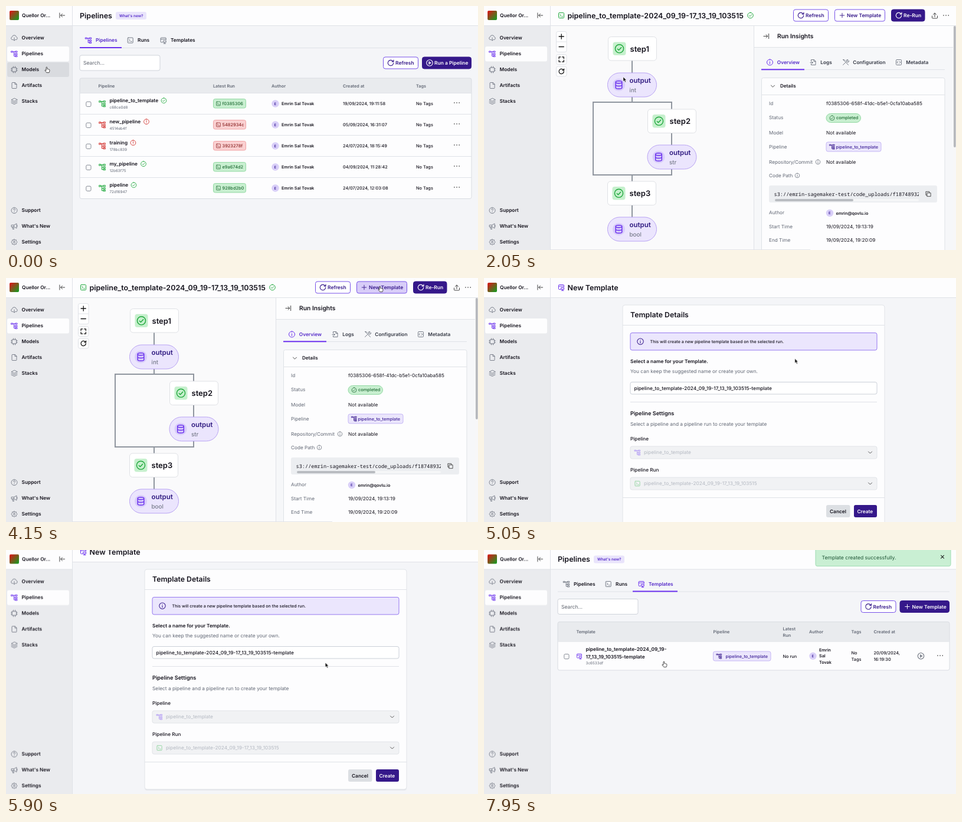
Recreate the animation shown at these times as an HTML page. Size 800x416 px, loop 8000 ms.

```html
<!DOCTYPE html>
<html lang="en">
<head>
<meta charset="utf-8">
<title>Pipeline dashboard</title>
<style>
html, body { margin: 0; width: 100%; height: 100%; overflow: hidden; background: #f4f5f8; }
svg { display: block; width: 100vw; height: 100vh; }
text { font-family: Inter, "Open Sans", sans-serif; text-rendering: geometricPrecision; white-space: pre; }
text.mono { font-family: "Noto Sans Mono", "DejaVu Sans Mono", monospace; }
</style>
</head>
<body>
<svg id="stage" viewBox="0 0 800 416"></svg>
<script>
const LOOP = 8000;
const INK = '#15131d', GRAY = '#626875', LINE = '#dfe2e7', WHITE = '#fdfdfe';
const DEEP = '#35188a', VIOLET = '#6a30ee', GREEN = '#1fa83c', RED = '#d2302c';
const PERSON = 'Emrin Sal Tovak', MAIL = 'emrin@qovlu.io';
const RUN = 'pipeline_to_template-2024_09_19-17_13_19_103515';

// Icons live on a 24 unit grid.
const RING = 'M12 2a10 10 0 1 0 0 20a10 10 0 1 0 0-20z';
const BOX = 'M5 3h14a2 2 0 0 1 2 2v14a2 2 0 0 1-2 2H5a2 2 0 0 1-2-2V5a2 2 0 0 1 2-2z';
const ICONS = {
  cloud: 'M7 18H6a5 5 0 0 1-1-9.8a7 7 0 0 1 13.7 0A5 5 0 0 1 18 18h-1M12 11v10M9 18l3 3 3-3',
  pipe: 'M2 3h5v4H2zM16 3h6v4h-6zM16 11h6v4h-6zM16 18h6v4h-6zM7 5h9M11 5v15h5M11 13h5',
  chip: 'M5 5h14v14H5zM9 1v4M15 1v4M9 19v4M15 19v4M1 9h4M1 15h4M19 9h4M19 15h4',
  file: 'M14 2H6a2 2 0 0 0-2 2v16a2 2 0 0 0 2 2h12a2 2 0 0 0 2-2V8zM14 2v6h6',
  layers: 'M12 2L2 7l10 5 10-5zM2 12l10 5 10-5M2 17l10 5 10-5',
  help: RING + 'M9 9a3 3 0 0 1 6 .5c0 2-3 2.5-3 4M12 17v.4',
  horn: 'M3 8h8l9-5v16l-9-5H3zM11 8v6M5 14l2 8h4l-2-8M22 9v4',
  gear: 'M12 2l2.5 3.2 4-.7.7 4L22 12l-2.8 3.5-.7 4-4-.7L12 22l-2.5-3.2-4 .7-.7-4L2 12l2.8-3.5.7-4 4 .7zM12 9a3 3 0 1 0 0 6a3 3 0 1 0 0-6z',
  fold: 'M3 3v18M22 12H7M13 6l-6 6 6 6',
  unfold: 'M21 3v18M2 12h15M11 6l6 6-6 6',
  term: BOX + 'M7 8l4 4-4 4M13 16h4',
  template: 'M21 10V5a2 2 0 0 0-2-2H5a2 2 0 0 0-2 2v12a2 2 0 0 0 2 2h4M3 8h18M12 13h9v6h-9zM16 19v4M13 23h7',
  refresh: 'M21 12a9 9 0 1 1-2.8-6.5L21.5 8M21.5 2.5V8H16',
  play: RING + 'M10 8l6 4-6 4z',
  check: RING + 'M7.5 12.5l3 3 6-6.5',
  alert: RING + 'M12 7v6M12 16.5v.4',
  info: RING + 'M12 11v6M12 7.2v.4',
  dots: 'M3 12h.3M12 12h.3M21 12h.3',
  share: 'M3 13v6a2 2 0 0 0 2 2h14a2 2 0 0 0 2-2v-6M12 16V3M7 8l5-5 5 5',
  logs: 'M5 9V3h10l5 5v13H5v-4M14 3v6h6M2 13h9M8 10l3 3-3 3',
  tools: 'M3 21L14 10M21 21l-7-7M3 3l7 7M3 3h4l3 3M14 10a5 5 0 0 1 6-7l-3 3 1 2 2 1 3-3a5 5 0 0 1-7 6',
  code: BOX + 'M9.5 8.5L6 12l3.5 3.5M14.5 8.5L18 12l-3.5 3.5',
  down: 'M4 8l8 8 8-8',
  copy: 'M8 8h13v13H8zM16 8V3H3v13h5',
  db: 'M4 5a8 3 0 0 1 16 0a8 3 0 0 1-16 0v14a8 3 0 0 0 16 0V5M4 12a8 3 0 0 0 16 0',
  plus: 'M12 3v18M3 12h18',
  minus: 'M3 12h18',
  expand: 'M3 9V3h6M15 3h6v6M21 15v6h-6M9 21H3v-6',
  close: 'M4 4l16 16M20 4L4 20'
};

const text = (x, y, s, size = 8.3, weight = 600, fill = INK, cls = '') =>
  `<text x="${x}" y="${y + size * .36}" font-size="${size}" font-weight="${weight}" fill="${fill}" class="${cls}">${s}</text>`;
const title = (x, y, s) => text(x, y, s, 12.5);
const rect = (x, y, x2, y2, fill, stroke = 'none', r = 3, extra = '') =>
  `<rect x="${x}" y="${y}" width="${x2 - x}" height="${y2 - y}" rx="${r}" fill="${fill}" stroke="${stroke}" ${extra}/>`;
const line = (d, color = LINE, width = 1) => `<path d="${d}" fill="none" stroke="${color}" stroke-width="${width}"/>`;
const icon = (name, x, y, size = 12, color = GRAY, width = 2) =>
  `<path transform="translate(${x - size / 2} ${y - size / 2}) scale(${size / 24})" d="${ICONS[name]}" fill="none" stroke="${color}" stroke-width="${width}" stroke-linecap="round" stroke-linejoin="round"/>`;
const avatar = (x, y) => `<circle cx="${x}" cy="${y}" r="6.2" fill="#d9cff8"/>` + text(x - 2, y, 'E', 6, 600, '#3f2499');
const group = (id, body, attrs = '') => `<g id="${id}" ${attrs}>${body}</g>`;
const dots = (x, y) => icon('dots', x, y, 11, '#333', 3.6);
const checkbox = y => rect(135.8, y - 4, 144, y + 4.2, WHITE, '#858a94', 2);
const header = (y = 33) => rect(112, y - 60, 800, y, WHITE, 'none', 0) + line(`M112 ${y}.5H800`);
const search = y => rect(125, y, 261, y + 26, '#fff', '#cfd3da') + text(131, y + 13, 'Search...', 8.6, 400, '#5c616c');

function button(x, x2, y, glyph, label, solid, id = '') {
  const color = solid ? '#fff' : DEEP;
  return rect(x + .5, y, x2 - .5, y + 20, solid ? DEEP : '#fff', solid ? DEEP : '#7650e8', 3.5, id && `id="${id}"`)
    + icon(glyph, x + 13, y + 10, glyph === 'plus' ? 10 : 12.5, color, 2.2)
    + text(x + 21, y + 10, label, 8.45, 600, color);
}

function table(y, headEnd, end, columns, headY) {
  return rect(125, y, 789, end, WHITE, 'none')
    + rect(125, y, 789, headEnd, '#e9ebee', 'none')
    + columns.map(([x, label, dy = 0]) => text(x, headY + dy, label, 7.25, 600, GRAY)).join('')
    + line(`M125 ${headEnd}H789`) + rect(125, y, 789, end, 'none', '#d9dce2');
}

const pipeBadge = (x, x2, y, textX, size) => rect(x, y, x2, y + 16, '#ebe6fc', '#c5b6f5')
  + icon('pipe', x + 10, y + 8, 10, DEEP) + text(textX, y + 8, 'pipeline_to_template', size, 500, '#3b1d96');

function sidebar() {
  const main = [['cloud', 'Overview'], ['pipe', 'Pipelines'], ['chip', 'Models'], ['file', 'Artifacts'], ['layers', 'Stacks']];
  const foot = [['help', 'Support'], ['horn', "What's New"], ['gear', 'Settings']];
  const item = top => ([glyph, label], i) => icon(glyph, 14, top + 27 * i, 12, label === 'Pipelines' ? VIOLET : '#767c87', 1.9)
    + text(26.5, top + 27 * i, label);
  return rect(0, -5, 112, 425, '#eaebee', 'none', 0)
    + rect(0, -5, 112, 33, WHITE, 'none', 0) + line('M0 33.5H112') + line('M112.5 0V425')
    + rect(6, 8, 22, 24, 'url(#org)', 'none', 2)
    + text(27, 16.3, 'Quellor Or...') + icon('fold', 95, 16, 11, '#333')
    + rect(2, 69, 107, 94.5, WHITE)
    + rect(2, 96, 107, 121, '#d9dbdf', 'none', 3, 'id="modelsHover"')
    + main.map(item(54.5)).join('') + foot.map(item(348.5)).join('');
}

function listHead(active) {
  const tabs = [['pipe', 'Pipelines', 125, 196], ['term', 'Runs', 196, 252], ['template', 'Templates', 252, 328]];
  return header() + title(125, 16.3, 'Pipelines')
    + rect(186, 10, 238, 23, '#e9e4fb') + text(192, 16.5, "What's new?", 6.5, 600, '#5429c9')
    + line('M125 71.5H789')
    + tabs.map(([glyph, label, x, x2]) => {
      const on = label === active;
      return icon(glyph, x + 14.7, 58.5, 12, on ? VIOLET : '#767c87') + text(x + 27, 58.5, label, 8.3, 600, on ? '#5429c9' : INK)
        + (on ? rect(x, 70, x2, 72, VIOLET, 'none', 0) : '');
    }).join('') + search(84);
}

function pipelinesPage() {
  const rows = [
    ['pipeline_to_template', 'c68ce0d8', 267.5, 'f0385306', '19/09/2024, 19:11:58', 1],
    ['new_pipeline', '4514eb4f', 238, '5482934c', '05/09/2024, 16:31:07', 0],
    ['training', '178bc839', 215.5, '3923278f', '24/07/2024, 18:15:49', 0],
    ['my_pipeline', '12b63f75', 233, 'e9a674d2', '04/09/2024, 11:28:42', 1],
    ['pipeline', '72d16947', 216.5, '928bd2b0', '24/07/2024, 12:03:08', 1]
  ];
  return listHead('Pipelines') + button(639, 699, 87, 'refresh', 'Refresh') + button(705, 789, 87, 'play', 'Run a Pipeline', true)
    + table(123, 148.5, 328.5, [[156.5, 'Pipeline'], [351, 'Latest Run'], [450, 'Author'], [571, 'Created at'], [695, 'Tags']], 136)
    + rows.map(([name, id, statusX, run, date, ok], i) => {
      const y = 166.5 + 36 * i, color = ok ? GREEN : RED, ink = ok ? '#1f6b34' : '#8b2424';
      return (i ? line(`M125 ${y - 18}H789`) : '') + checkbox(y + .7) + icon('pipe', 163, y, 12.5, color)
        + text(175.5, y - 5.3, name) + text(175.5, y + 6, id, 6.4, 400, GRAY)
        + icon(ok ? 'check' : 'alert', statusX, y - 5.3, 10.5, color)
        + rect(351.5, y - 8, 406.5, y + 7.5, ok ? '#c8efd0' : '#fad0d1', ok ? '#93d9a4' : '#f0a3a5')
        + icon('term', 360, y, 9, ink) + text(366.5, y, run, 7.4, 500, ink)
        + avatar(456.5, y) + text(467, y, PERSON, 7.2) + text(571, y, date, 7.35, 500) + text(695, y, 'No Tags', 7.35, 500) + dots(764, y - 1.5);
    }).join('');
}

function runsPage() {
  return header() + icon('pipe', 131, 16, 12.5) + title(141.5, 16, 'pipeline_to_template') + icon('share', 783, 16.5, 12, '#333')
    + search(45) + button(639, 699, 48.5, 'refresh', 'Refresh') + button(705, 789, 48.5, 'play', 'Run a Pipeline', true)
    + table(85, 110, 146, [[135.5, 'Run'], [465.5, 'Model'], [518, 'Stack'], [572, 'Created at'], [686.5, 'Author']], 97.5)
    + icon('term', 142, 128, 13.5, GREEN) + text(154.5, 122.7, RUN) + icon('check', 364, 122.7, 10.5, GREEN)
    + text(154.5, 134, 'f0385306', 6.4, 400, GRAY)
    + rect(518, 120, 541.5, 135.5, '#cfe0dd', '#aac8c4') + text(522.5, 128, 'dev', 7.6, 500, '#2f8a50')
    + text(572, 128, '19/09/2024, 19:13:19', 7.4, 400, GRAY) + avatar(692.5, 128) + text(703, 128, MAIL, 7.3, 500);
}

const stepNode = (x, y, label) => rect(x, y, x + 82, y + 40.5, '#fff', '#dfe1e5', 5)
  + rect(x + 8, y + 9, x + 30, y + 31.5, '#c6f0cd', 'none', 4) + icon('check', x + 19, y + 20.3, 17, GREEN)
  + text(x + 37, y + 20.5, label, 13);
const outputNode = (x, y, type) => rect(x, y, x + 83, y + 41, '#ebe5fd', '#b8a2f3', 20.5)
  + `<circle cx="${x + 19}" cy="${y + 20.5}" r="10.5" fill="#d8ccfa"/>` + icon('db', x + 19, y + 20.5, 16, VIOLET, 2.2)
  + text(x + 37, y + 13, 'output', 11.5, 600, '#2f1a80') + text(x + 37, y + 29, type, 9.9, 400, GRAY);

function runPage() {
  const tabs = [['info', 'Overview', 484.5], ['logs', 'Logs', 558], ['tools', 'Configuration', 613], ['code', 'Metadata', 703]];
  const labels = [['Id', 166.5], ['Status', 190], ['Model', 216], ['Pipeline', 239.7], ['Repository/Commit', 266], ['Code Path', 289],
    ['Author', 352.5], ['Start Time', 376.5], ['End Time', 399.5]];
  const values = [['f0385306-658f-41dc-b5e1-0cfa10aba585', 166.5], ['Not available', 216], ['Not available', 266],
    ['19/09/2024, 19:13:19', 376.5], ['19/09/2024, 19:20:09', 399.5]];
  const graph = line('M251 93V164M185 164H318V288H185ZM251 288V365', '#8f959e', 2)
    + stepNode(210.5, 52.5, 'step1') + outputNode(209.5, 114, 'int')
    + stepNode(277.5, 176, 'step2') + outputNode(277, 237, 'str')
    + stepNode(209.5, 299, 'step3') + outputNode(209.5, 360, 'bool');
  const controls = rect(122.5, 43.5, 140, 78.5, '#fff', LINE) + line('M122.5 61H140')
    + rect(122.5, 82.5, 140, 99.5, '#fff', LINE) + rect(122.5, 103, 140, 120, '#fff', LINE)
    + [['plus', 52], ['minus', 69.5], ['expand', 91], ['refresh', 111.5]].map(([n, y]) => icon(n, 131.2, y, 11, '#111', 2.8)).join('');
  const panel = rect(457, 33, 800, 416, '#f6f7f9', 'none', 0) + rect(457, 33, 795, 70.5, WHITE, 'none', 0)
    + line('M457.5 33V416M457 70.5H795M470 108.5H781') + rect(470, 107.3, 543, 109.3, VIOLET, 'none', 0)
    + icon('unfold', 478.5, 51.5, 11, '#333') + text(497, 51.5, 'Run Insights', 10.3)
    + tabs.map(([glyph, label, x], i) => icon(glyph, x, 96, 12, i ? '#767c87' : VIOLET)
      + text(x + 12.3, 96, label, 8.3, 600, i ? '#353945' : '#5429c9')).join('')
    + rect(470.5, 122.5, 781, 430, WHITE, LINE) + line('M470 151.5H781') + icon('down', 489.5, 136.7, 9, '#333', 2.4) + text(502, 136.6, 'Details', 8)
    + labels.map(([s, y]) => text(483, y, s, 8.2, 400, GRAY)).join('')
    + values.map(([s, y]) => text(580, y, s, 8.25, 400)).join('')
    + rect(580, 183.5, 638.5, 198.5, '#c8efd0', '#93d9a4', 7.5) + icon('check', 590, 191, 9.5, '#1f6b34') + text(597, 190.7, 'completed', 7.4, 500, '#1f6b34')
    + pipeBadge(580, 673, 232, 596.5, 7.3) + icon('info', 566, 266, 9) + icon('info', 531, 289, 9)
    + rect(483, 306, 768, 335, '#eceef1') + `<g clip-path="url(#path)">`
    + text(491.5, 320.5, 's3://emrin-sagemaker-test/code_uploads/f18748932', 8.6, 500, INK, 'mono') + '</g>'
    + rect(493, 329, 737, 333, '#f5f6f7', 'none', 2) + rect(493, 329, 626, 333, '#b9bcc1', 'none', 2) + icon('copy', 753, 320.5, 11, '#444')
    + avatar(586, 353) + text(596.5, 353, MAIL, 7.2)
    + rect(795, 33, 800, 416, '#f7f7f8', 'none', 0) + rect(796, 34, 799.7, 241, '#b6b8bc', 'none', 2);
  return rect(112, 33, 457, 416, '#fafafb', 'none', 0) + graph + controls + panel + header()
    + icon('term', 131, 16, 12, GREEN) + title(141.5, 16, RUN) + icon('check', 451.5, 16, 11.5, GREEN)
    + button(524, 584, 6, 'refresh', 'Refresh') + button(594, 680, 6, 'plus', 'New Template', false, 'newButton')
    + button(690, 747.5, 6, 'refresh', 'Re-Run', true) + icon('share', 764, 16.5, 12, '#444') + dots(783, 16)
    + line('M112 415.5H553', '#e3e4e8');
}

function formPage() {
  const select = (y, glyph, color, label) => rect(248, y, 666, y + 21, '#f1f2f4', '#e1e4e8')
    + icon(glyph, 260, y + 10.5, 11, color) + text(271, y + 10.5, label, 8.3, 400, '#b4b9c2') + icon('down', 654.5, y + 10.5, 9, '#444', 2.4);
  return header(20) + icon('template', 131, 3, 12, VIOLET) + title(141.5, 3, 'New Template')
    + rect(235, 34.5, 679, 410, '#e6e8ec', 'none', 4) + rect(235, 33, 679, 408, WHITE, '#e1e4e8', 4)
    + text(248, 50, 'Template Details', 12.3) + line('M235 67.5H679M248 198.5H666M235 361.5H679')
    + rect(248, 80.5, 666, 110, '#ebe6fd', '#9477f0') + icon('info', 265, 95.3, 12.5, DEEP)
    + text(281.5, 95.3, 'This will create a new pipeline template based on the selected run.', 7.15, 500)
    + text(248, 129, 'Select a name for your Template.')
    + text(248, 146, 'You can keep the suggested name or create your own.', 8.4, 400, GRAY)
    + rect(248, 164.5, 666, 185, '#fff', '#cbd0d8') + text(254.5, 175, RUN + '-template', 8.3, 500)
    + text(248, 218, 'Pipeline Settigns', 9.2)
    + text(248, 236.3, 'Select a pipeline and a pipeline run to create your template', 8.35, 400, GRAY)
    + text(248, 261, 'Pipeline', 8.2, 500) + select(274, 'pipe', '#b29bf5', 'pipeline_to_template')
    + text(248, 314.3, 'Pipeline Run', 8.2, 500) + select(327, 'term', '#92d5a0', RUN)
    + rect(580, 374, 620.5, 395, '#dcdfe3') + text(586, 384.7, 'Cancel')
    + rect(627, 374, 666, 395, DEEP, 'none', 3, 'id="createButton"') + text(632.5, 384.7, 'Create', 8.3, 600, '#fff');
}

function templatesPage() {
  const words = PERSON.split(' ');
  return listHead('Templates') + button(638.5, 698.5, 87, 'refresh', 'Refresh') + button(704.5, 789, 87, 'plus', 'New Template', true)
    + table(123, 156.5, 205.5, [[156.5, 'Template'], [388.5, 'Pipeline'], [506.5, 'Latest', -5.5], [506.5, 'Run', 5.5], [551, 'Author'], [622.5, 'Tags'], [660.5, 'Created at']], 140)
    + checkbox(182) + icon('template', 161.5, 181.5, 10.5, VIOLET)
    + text(172.5, 170, RUN.slice(0, 32)) + text(172.5, 182.5, RUN.slice(32) + '-template') + text(172.5, 193.5, '3c6533df', 6.4, 400, GRAY)
    + pipeBadge(388.5, 486, 173.5, 409.5, 7.3) + text(506.5, 181.5, 'No run', 7.35, 500)
    + avatar(557.5, 181.3) + words.map((w, i) => text(568, 170.7 + 10.6 * i, w, 7.2)).join('')
    + text(622.5, 176, 'No', 7.35, 500) + text(622.5, 187, 'Tags', 7.35, 500)
    + text(660.5, 176, '20/09/2024,', 7.35, 500) + text(660.5, 187, '16:19:30', 7.35, 500)
    + icon('play', 740.5, 181.3, 12.5) + dots(773, 180.5);
}

const toast = rect(562, -6, 791, 27.5, '#c9efd3', '#9fdcb2') + text(572.5, 13.2, 'Template created successfully.', 8.6, 400, '#1d5434')
  + icon('close', 777, 11.7, 7.5, '#222', 3.4);
const arrow = '<path d="M0 0V7.6L1.8 6 3.1 9 4.5 8.4 3.2 5.5H5.5Z" fill="#111" stroke="#fff" stroke-width=".5"/>';
const hand = '<path d="M0 1.2Q0 0 .9 0 1.8 0 1.8 1.2V3.6Q2.5 3 3.2 3.8 4 3.2 4.6 4.1 5.8 3.8 5.9 5V6.6Q5.8 8 5 9.6H.8Q-.2 8-2 6.2-2.3 5.2-1.3 5.2L0 6.2Z" fill="#fff" stroke="#222" stroke-width=".8" stroke-linejoin="round"/>';

const stage = document.getElementById('stage');
stage.innerHTML = `<defs><linearGradient id="org" x2="1" y2="1"><stop offset=".1" stop-color="#cf1f18"/><stop offset=".9" stop-color="#1f9420"/></linearGradient>
  <clipPath id="path"><rect x="483" y="306" width="254" height="29"/></clipPath></defs>`
  + group('pipelines', pipelinesPage()) + group('runs', runsPage()) + group('run', runPage()) + group('form', formPage())
  + group('templates', templatesPage(), 'transform="translate(0 -.5)"') + group('sidebar', sidebar()) + group('toast', toast)
  + group('cursor', group('arrow', arrow) + group('hand', hand));

function play(id, prop, steps, easing) {
  const frames = steps.map(([t, value]) => ({ offset: t / LOOP, [prop]: value, easing }));
  frames.push({ offset: 1, [prop]: steps[steps.length - 1][1] });
  document.getElementById(id).animate(frames, { duration: LOOP, iterations: Infinity });
}
const hard = (id, prop, steps) => play(id, prop, steps, 'step-end');
const glide = (id, steps) => play(id, 'transform', steps.map(([t, x, y]) => [t, `translate(${x}px, ${y}px)`]), 'ease-in-out');
const showFrom = (id, from, to) => hard(id, 'opacity', [...(from ? [[0, 0]] : []), [from, 1], ...(to < LOOP ? [[to, 0]] : [])]);

showFrom('pipelines', 0, 900);
showFrom('runs', 900, 1950);
showFrom('run', 1950, 4250);
showFrom('form', 4250, 7200);
showFrom('templates', 7200, LOOP);
showFrom('modelsHover', 0, 150);
hard('newButton', 'fill', [[0, '#fff'], [3450, '#d8cdf8']]);
hard('createButton', 'fill', [[0, DEEP], [6400, VIOLET]]);

glide('form', [[0, 0, 13], [5150, 0, 13], [5400, 0, -2.6], [5500, 0, -2.6], [5800, 0, 0]]);
glide('sidebar', [[0, 0, 0], [5150, 0, 0], [5400, 0, -3.1], [5500, 0, -3.1], [5800, 0, -.5]]);
glide('toast', [[0, 0, -40], [7250, 0, -40], [7450, 0, 0]]);
glide('cursor', [[0, 68, 104], [80, 68, 104], [600, 194, 162], [1250, 194, 162], [1700, 236, 121], [2200, 236, 121],
  [2750, 541, 83], [2900, 541, 83], [3600, 633, 14], [4500, 633, 14], [5200, 516, 150], [5650, 516, 150],
  [6500, 655, 382], [7050, 655, 382], [7700, 304, 190]]);
const handTimes = [[0, 1], [150, 0], [520, 1], [900, 0], [1600, 1], [1950, 0], [3450, 1], [4250, 0], [6400, 1], [7200, 0], [7600, 1]];
hard('hand', 'opacity', handTimes);
hard('arrow', 'opacity', handTimes.map(([t, on]) => [t, 1 - on]));
</script>
</body>
</html>
```
